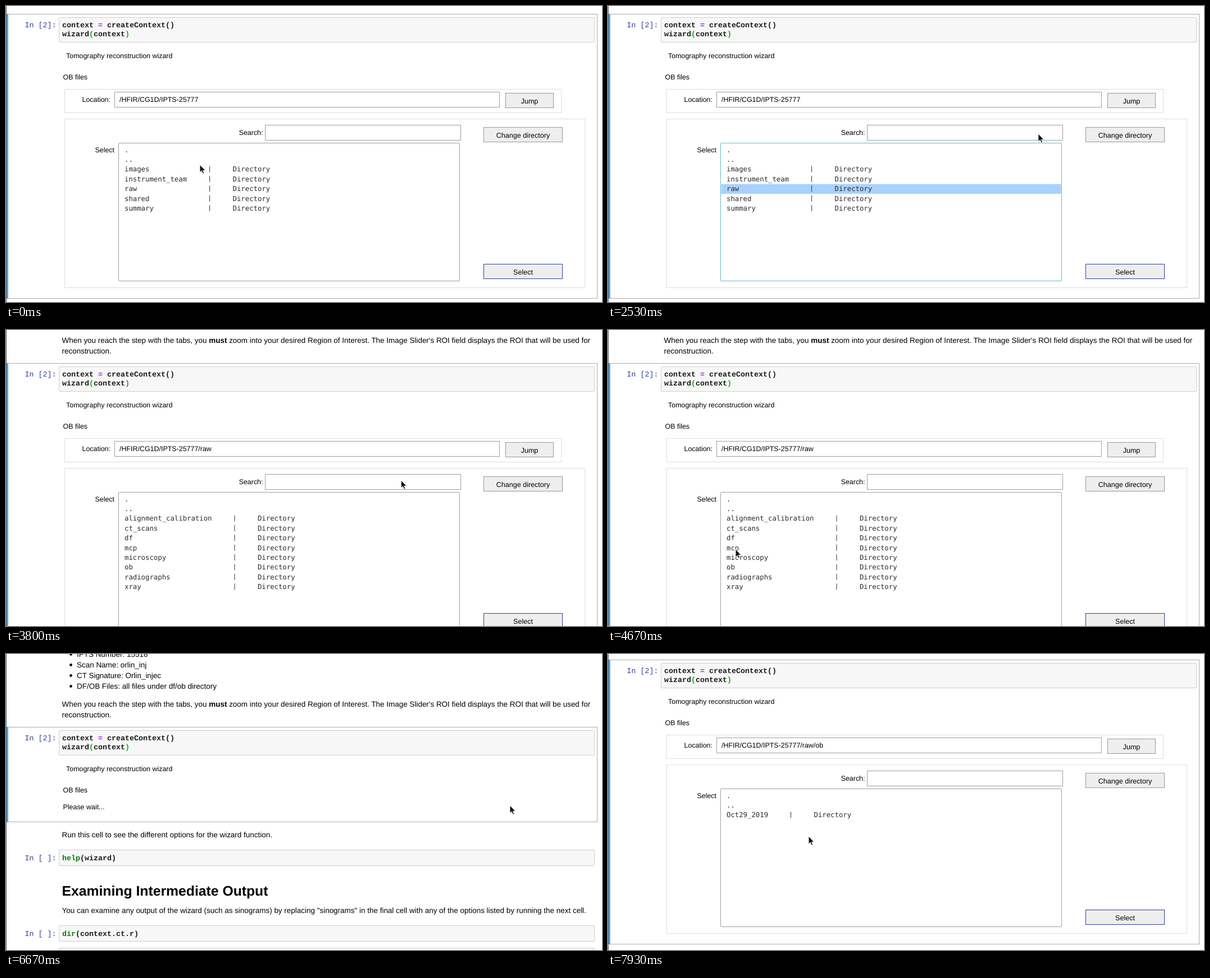
Write an HTML page that moves like this. It is 1061 by 528 pixels and loops after 8000 ms.

```html
<!DOCTYPE html>
<html lang="en">
<head>
<meta charset="utf-8">
<title>Tomography reconstruction wizard</title>
<style>
  html, body { margin: 0; width: 100%; height: 100%; overflow: hidden; background: #fff; }
  svg { display: block; width: 1061px; height: 528px; }
  text { font: 12.45px "Liberation Sans", Arial, sans-serif; fill: #000; text-rendering: geometricPrecision; white-space: pre; }
  .prose { font-size: 13.46px; }
  .title { font-size: 24.74px; font-weight: bold; }
  .code, .prompt { font: bold 13.33px "Liberation Mono", "Courier New", monospace; fill: #1a1a1a; }
  .prompt { font-weight: normal; fill: #303f9f; }
  .row { font: 12.3px "DejaVu Sans Mono", monospace; fill: #2b2b2b; }
  .button { font-size: 12.55px; text-anchor: middle; }
  .end { text-anchor: end; }
  .bold { font-weight: bold; }
  .op { fill: #a2f; }
  .keyword { fill: #008000; }
  .bracket { fill: #0b0; }
  .hover { filter: drop-shadow(0 1px 2px rgba(0, 0, 0, .35)); }
</style>
</head>
<body>
<svg id="stage" viewBox="0 0 1061 528"></svg>
<script>
const LOOP = 8000, TICK = 1000 / 15;
const FULL = 507, SHORT = 169;

// Text is placed by the middle of its capitals.
const text = (x, y, content, cls = '', drop = 4.4) =>
  `<text x="${x}" y="${y + drop}" class="${cls}">${content}</text>`;
const box = (x, y, right, bottom, stroke, fill = 'none', extra = '') =>
  `<rect x="${x + .5}" y="${y + .5}" width="${right - x - 1}" height="${bottom - y - 1}" stroke="${stroke}" fill="${fill}" ${extra}/>`;
const button = (x, y, right, label, stroke = '#999') =>
  box(x, y, right, y + 27, stroke, '#eee') + text((x + right) / 2, y + 14.3, label, 'button');
const codeBox = (top, bottom) => box(94, top, 1048, bottom, '#cfcfcf', '#f7f7f7', 'rx="1.5"');
const span = (cls, content) => `<tspan class="${cls}">${content}</tspan>`;
const prompt = (y, count) => text(33.5, y, `In [${count}]:`, 'prompt');

const above = ['IPTS Number: 15518', 'Scan Name: orlin_inj', 'CT Signature: Orlin_injec',
  'DF/OB Files: all files under df/ob directory']
  .map((item, i) => `<circle cx="115.5" cy="${-129.5 + 19 * i}" r="2.4"/>` + text(126, -130 + 19 * i, item, 'prose', 4.8))
  .join('') +
  text(99.5, -41, `When you reach the step with the tabs, you ${span('bold', 'must')} zoom into your desired Region of Interest. The Image Slider's ROI field displays the ROI that will be used for`, 'prose', 4.8) +
  text(99.5, -22, 'reconstruction.', 'prose', 4.8);

const input = codeBox(6, 51) + prompt(19.5, 2) +
  text(100, 19.5, `context ${span('op', '=')} createContext()`, 'code') +
  text(100, 36, `wizard${span('bracket', '(')}context${span('bracket', ')')}`, 'code') +
  text(107, 75, 'Tomography reconstruction wizard') + text(101.5, 113, 'OB files');

const emptyCell = (top, name, args) => codeBox(top, top + 29) + prompt(top + 14.5, ' ') +
  text(100, top + 14.5, span('keyword', name) + args, 'code');

const below = text(99.5, 23, 'Run this cell to see the different options for the wizard function.', 'prose', 4.8) +
  emptyCell(50, 'help', '(wizard)') +
  text(99.5, 123.5, 'Examining Intermediate Output', 'title', 8.3) +
  text(99.5, 158.5, 'You can examine any output of the wizard (such as sinograms) by replacing "sinograms" in the final cell with any of the options listed by running the next cell.', 'prose', 4.8) +
  emptyCell(185, 'dir', '(context.ct.r)') + codeBox(225, 254);

const browser = box(104, 134, 989, 177, '#ddd') +
  text(186, 153, 'Location:', 'end') + box(193, 139, 879, 167, '#9e9e9e') +
  '<text id="path" x="202" y="157.4"/>' + button(889, 141, 975, 'Jump') +
  box(104, 187, 1031, 489, '#ddd') +
  text(457.5, 211.5, 'Search:', 'end') + box(461, 198, 810, 226, '#9e9e9e') +
  `<g id="change">${button(850, 202, 991, 'Change directory')}</g>` +
  text(193, 243, 'Select', 'end') +
  box(200, 230, 808, 477, '#9e9e9e', '#fff', 'id="frame" rx="1.5"') +
  '<rect id="mark" x="201.5" width="605" height="17.4" fill="#a8d1ff"/><g id="rows"></g>' +
  button(850, 446, 991, 'Select', '#303f9f');

const stage = document.getElementById('stage');
stage.innerHTML = `<g id="page">
  <g>${above}</g>
  <rect id="cell" x="1.5" y=".5" width="1051" fill="#fff" stroke="#ababab"/>
  <rect id="bar" x="0" y="0" width="4" fill="#42a5f5"/>
  ${input}
  <g id="wait">${text(101.5, 143, 'Please wait...')}</g>
  <g id="browser">${browser}</g>
  <g id="below">${below}</g></g>
  <rect width="1" height="528" fill="#555"/>
  <path id="cursor" d="M0 0V14.2L3.2 11.2L5.4 16.2L7.8 15.2L5.6 10.4H10Z" fill="#111" stroke="#fff" stroke-width="1"/>`;
const $ = id => document.getElementById(id);

const root = '/HFIR/CG1D/IPTS-25777';
const folders = {
  [root]: ['images', 'instrument_team', 'raw', 'shared', 'summary'],
  [root + '/raw']: ['alignment_calibration', 'ct_scans', 'df', 'mcp', 'microscopy', 'ob', 'radiographs', 'xray'],
  [root + '/raw/ob']: ['Oct29_2019']
};
const rowY = i => 242.2 + 17.4 * i;

function listRows(names) {
  const column = Math.max(...names.map(n => n.length)) + 5, advance = 7.405;
  return text(211, rowY(0), '.', 'row') + text(211, rowY(1), '..', 'row') +
    names.map((name, i) => {
      const y = rowY(i + 2);
      return text(211, y, name, 'row') +
        `<rect x="${211 + (column + .5) * advance - .8}" y="${y - 5.5}" width="1.1" height="11" fill="#444"/>` +
        text(211 + (column + 6) * advance, y, 'Directory', 'row');
    }).join('');
}

// time, cell top, folder (none while waiting), selected row
const scenes = [
  [0, 14, root], [2000, 14, root, 4],
  [3070, 130], [3330, 59, root + '/raw'], [5400, 59, root + '/raw', 7],
  [6470, 130], [6730, 59, root + '/raw/ob'],
  [7730, 33, root + '/raw/ob'], [7800, 15, root + '/raw/ob'],
  [7870, 11, root + '/raw/ob'], [7930, 10, root + '/raw/ob']
];

// time, x, y of the pointer tip
const pointer = [
  [0, 345, 283], [267, 345, 283], [470, 620, 222], [667, 909, 250], [870, 640, 262],
  [1133, 316, 294], [1333, 212, 308], [1400, 212, 308], [1800, 224, 320], [2133, 224, 320],
  [2267, 270, 327], [2600, 890, 203], [2733, 912, 222], [3533, 912, 222], [4400, 234, 371],
  [4667, 227, 391], [4800, 227, 391], [5200, 239, 418], [5467, 239, 418], [5933, 880, 295],
  [6067, 892, 270], [6200, 892, 270], [6333, 897, 270], [7200, 897, 270], [7467, 357, 325],
  [LOOP, 357, 325]
];

function pointerAt(t) {
  const i = Math.max(1, pointer.findIndex(p => p[0] >= t));
  const [t0, x0, y0] = pointer[i - 1], [t1, x1, y1] = pointer[i];
  const k = (t - t0) / (t1 - t0);
  return [x0 + (x1 - x0) * k, y0 + (y1 - y0) * k];
}

const show = (id, on) => { $(id).style.display = on ? '' : 'none'; };
let current;

function setScene(scene) {
  const [, top, folder, selected] = scene;
  const height = folder ? FULL : SHORT;
  $('page').setAttribute('transform', `translate(0 ${top})`);
  $('cell').setAttribute('height', height);
  $('bar').setAttribute('height', height + 1);
  $('below').setAttribute('transform', `translate(0 ${height})`);
  show('wait', !folder);
  show('browser', folder);
  show('mark', selected);
  if (!folder) return;
  $('path').textContent = folder;
  $('rows').innerHTML = listRows(folders[folder]);
  $('frame').setAttribute('stroke', selected ? '#66bcc9' : '#9e9e9e');
  if (selected) $('mark').setAttribute('y', rowY(selected) - 8.2);
}

function draw(time) {
  const t = time % LOOP;
  const scene = scenes.findLast(s => s[0] <= t);
  if (scene !== current) setScene(current = scene);
  const [x, y] = pointerAt(Math.floor((t + 4) / TICK) * TICK);
  $('cursor').setAttribute('transform', `translate(${x} ${y})`);
  const inside = x > 850 && x < 991 && y > scene[1] + 202 && y < scene[1] + 229;
  $('change').setAttribute('class', inside ? 'hover' : '');
}

let start;
function loop(now) {
  start ??= now;
  draw(now - start);
  requestAnimationFrame(loop);
}
draw(0);
requestAnimationFrame(loop);
</script>
</body>
</html>
```
